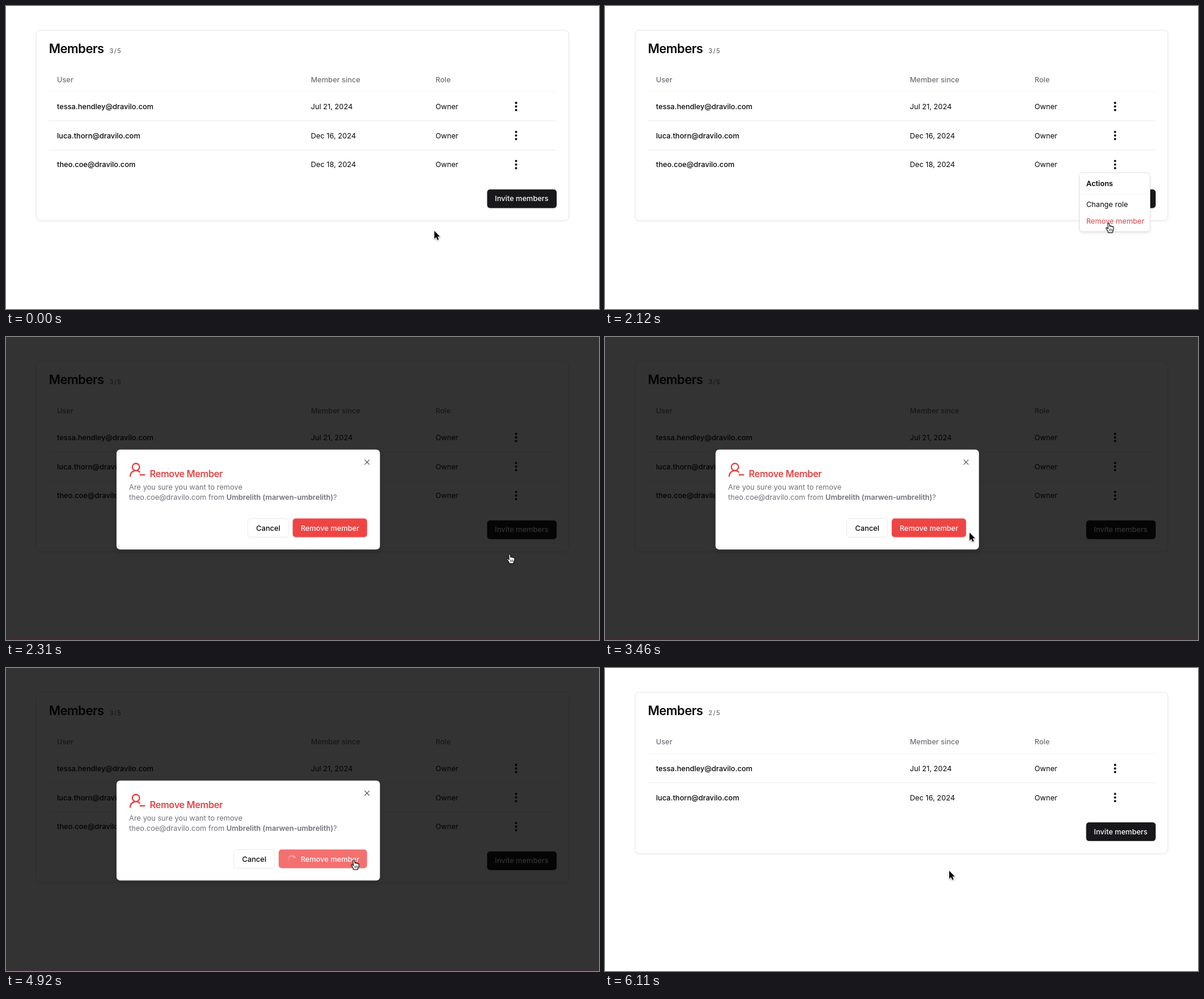
These frames come from a looping animation (994 px wide and 508 px high, 6190 ms). An HTML page with a canvas:

```html
<!DOCTYPE html>
<html lang="en">
<head>
<meta charset="utf-8">
<title>Members</title>
<style>
  html, body { margin: 0; width: 100%; height: 100%; overflow: hidden; background: #fff; }
  canvas { display: block; width: 994px; height: 508px; }
</style>
</head>
<body>
<canvas id="stage"></canvas>
<script>
const W = 994, H = 508, LOOP = 6190, ROW = 48.7;
const RED = '#ef4444', INK = '#09090b', MUTED = '#71717a', LINE = '#e4e4e7';
const canvas = document.getElementById('stage');
const ctx = canvas.getContext('2d');
const dpr = window.devicePixelRatio || 1;
canvas.width = W * dpr;
canvas.height = H * dpr;

const members = [
  ['tessa.hendley@dravilo.com', 'Jul 21, 2024'],
  ['luca.thorn@dravilo.com', 'Dec 16, 2024'],
  ['theo.coe@dravilo.com', 'Dec 18, 2024']
];

const inOut = p => p * p * (3 - 2 * p);
const out = p => 1 - (1 - p) ** 2;

// Pointer moves: start, end, steps, target x, target y, easing
const start = [718, 377];
const moves = [
  [100, 500, 5, 853, 262, inOut],
  [1260, 1840, 8, 844, 364, inOut],
  [2650, 3190, 7, 646, 335.6, inOut],
  [3280, 3810, 6, 583, 322, out],
  [5540, 5540, 1, 582, 323, out],
  [6110, 6110, 1, 577, 340, out]
];
const between = (t, a, b) => t >= a && t < b;

// Value of the last [time, value] pair reached
function held(t, pairs) {
  let v = 0;
  for (const [at, value] of pairs) if (t >= at) v = value;
  return v;
}

function pointerAt(t) {
  let [x, y] = start;
  for (const [a, b, n, tx, ty, ease] of moves) {
    if (t < a) break;
    const i = n > 1 ? Math.min(n - 1, Math.floor((t - a) / (b - a) * (n - 1))) : 0;
    const p = ease((i + 1) / n);
    x += (tx - x) * p;
    y += (ty - y) * p;
  }
  return [x, y];
}

function text(str, x, y, { size = 12.2, weight = 400, color = INK, align = 'left', spacing = 0 } = {}) {
  ctx.font = `${weight} ${size}px Inter, "Liberation Sans", sans-serif`;
  ctx.letterSpacing = spacing + 'px';
  ctx.textAlign = align;
  ctx.fillStyle = color;
  ctx.fillText(str, x, y);
  return x + ctx.measureText(str).width;
}

function box(x, y, w, h, r, fill, border, shadow) {
  ctx.save();
  ctx.beginPath();
  ctx.roundRect(x, y, w, h, r);
  if (shadow) {
    const [alpha, blur, dy] = shadow;
    ctx.shadowColor = `rgba(0,0,0,${alpha})`;
    ctx.shadowBlur = blur * dpr;
    ctx.shadowOffsetY = dy * dpr;
  }
  ctx.fillStyle = fill;
  ctx.fill();
  ctx.shadowColor = 'transparent';
  if (border) {
    ctx.strokeStyle = border;
    ctx.lineWidth = 1;
    ctx.stroke();
  }
  ctx.restore();
}

function rule(x1, x2, y, color) {
  ctx.fillStyle = color;
  ctx.fillRect(x1, y, x2 - x1, 1);
}

function strokePath(d, color, width) {
  ctx.strokeStyle = color;
  ctx.lineWidth = width;
  ctx.lineCap = ctx.lineJoin = 'round';
  ctx.stroke(new Path2D(d));
}

function drawCard(count) {
  const lift = (3 - count) * ROW;
  box(50.5, 40.5, 893, 319.5 - lift, 7, '#fff', LINE, [0.05, 2, 1]);
  text('Members', 72, 79, { size: 20.9, weight: 600, spacing: -0.52 });
  text(count + '/5', 173.5, 79, { size: 10.4, color: '#52525b', spacing: 1.4 });

  const head = { weight: 500, color: MUTED };
  text('User', 85.5, 127.6, head);
  text('Member since', 511, 127.6, head);
  text('Role', 720, 127.6, head);
  rule(72, 923, 143, '#f4f4f5');

  members.slice(0, count).forEach(([mail, since], i) => {
    const y = 168.4 + i * ROW;
    text(mail, 85.5, y + 4.5, { weight: 500 });
    text(since, 511, y + 4.5);
    text('Owner', 720, y + 4.5);
    ctx.fillStyle = INK;
    for (const dy of [-6, 0, 6]) {
      ctx.beginPath();
      ctx.arc(855, y + dy, 1.9, 0, Math.PI * 2);
      ctx.fill();
    }
    if (i < count - 1) rule(72, 923, Math.round(192 + i * ROW), '#ebebed');
  });

  box(806.5, 307.5 - lift, 116.5, 31.3, 5, '#18181b', null, [0.12, 2, 1]);
  text('Invite members', 864.5, 327.3 - lift, { weight: 500, color: '#fafafa', align: 'center' });
}

function drawMenu(alpha) {
  ctx.save();
  ctx.globalAlpha = alpha;
  const scale = 0.95 + 0.05 * alpha;
  ctx.translate(855, 279);
  ctx.scale(scale, scale);
  ctx.translate(-855, -279);
  box(795.5, 279.5, 118, 98.5, 5, '#fff', LINE, [0.12, 5, 2]);
  text('Actions', 806.7, 302, { weight: 600 });
  rule(796, 913, 315, '#f1f1f3');
  text('Change role', 806.7, 337.3);
  text('Remove member', 806.7, 364.6, { color: '#d64545' });
  ctx.restore();
}

function drawSpinner(x, y, angle) {
  ctx.save();
  ctx.translate(x, y);
  ctx.rotate(angle);
  ctx.lineCap = 'round';
  ctx.lineWidth = 1.1;
  for (let i = 0; i < 12; i++) {
    ctx.strokeStyle = `rgba(255,255,255,${Math.max(0, 0.85 - i * 0.12)})`;
    ctx.beginPath();
    ctx.moveTo(4.2, 0);
    ctx.lineTo(6.8, 0);
    ctx.stroke();
    ctx.rotate(-Math.PI / 6);
  }
  ctx.restore();
}

function drawDialog(t, alpha) {
  const loading = between(t, 4470, 5000);
  const hover = between(t, 3600, 4470);
  const grow = loading ? 23.5 : 0;
  const scale = 0.957 + 0.043 * alpha;
  ctx.save();
  ctx.globalAlpha = alpha;
  ctx.translate(406, 272.5 + 3 * (1 - alpha));
  ctx.scale(scale, scale);
  ctx.translate(-406, -272.5);
  box(185.3, 188.7, 441.5, 167.6, 6, '#fff', null, [0.15, 8, 4]);

  strokePath('M601.5 206.2l7.4 7.4M608.9 206.2l-7.4 7.4', '#52525b', 1.2);

  ctx.save();
  ctx.translate(205.8, 208.4);
  ctx.scale(1.2, 1.2);
  strokePath('M2 21a8 8 0 0 1 13.292-6M22 19h-6M15 8a5 5 0 1 1-10 0a5 5 0 1 1 10 0', '#e34646', 1.9);
  ctx.restore();

  text('Remove Member', 241, 234.6, { size: 15.6, weight: 600, color: '#e34646', spacing: -0.39 });
  const body = { color: MUTED };
  text('Are you sure you want to remove', 206.3, 255.5, body);
  let x = text(members[2][0] + ' from ', 206.3, 272.8, body);
  x = text('Umbrelith (marwen-umbrelith)', x, 272.8, { weight: 600, color: MUTED });
  text('?', x, 272.8, body);

  box(405.3 - grow, 304.5, 68.4, 31, 5, '#fff', '#ebebed', [0.04, 2, 1]);
  text('Cancel', 439.5 - grow, 324.7, { weight: 500, align: 'center' });
  const fill = loading ? '#f37070' : hover ? '#f15757' : RED;
  box(480.6 - grow, 304.3, 124.6 + grow, 31.2, 5, fill, null, [0.1, 2, 1]);
  text('Remove member', 543, 324.7, { weight: 500, color: '#fafafa', align: 'center' });
  if (loading) {
    const tick = Math.floor((t - 4380) / 90) * 90 + 4380;
    drawSpinner(479, 320, (tick - 4920) / 1000 * Math.PI * 2 - 0.5);
  }
  ctx.restore();
}

const arrow = new Path2D('M0 0V13.2L3 10.4 5.1 15.2 7.4 14.2 5.3 9.5H9.4z');
const hand = new Path2D('M4.2 10.5 2.6 8.8C1.6 7.9.3 8.8 1 10l3.2 4.8v1.9h7.6v-1.9c1.2-1.6 1.6-3.2 1.6-5.2V7.8' +
  'c0-1.3-2-1.4-2-.2v-.5c0-1.3-2.2-1.4-2.2-.2v-.5C9.2 5.2 7 5.2 7 6.4L6.2 1.9C5.9.4 3.7.8 3.9 2.3z');

function drawPointer(t) {
  const [x, y] = pointerAt(t);
  const pointing = between(t, 400, 2650) || between(t, 3600, 5540);
  ctx.save();
  ctx.translate(x, y);
  ctx.lineJoin = 'round';
  ctx.shadowColor = 'rgba(0,0,0,.35)';
  ctx.shadowBlur = 2.5 * dpr;
  ctx.shadowOffsetY = dpr;
  if (pointing) {
    ctx.translate(-5, -1);
    ctx.fillStyle = '#fff';
    ctx.fill(hand);
    ctx.shadowColor = 'transparent';
    ctx.strokeStyle = '#111';
    ctx.lineWidth = 1.1;
    ctx.stroke(hand);
    strokePath('M6.6 10.8v3M8.6 10.8v3M10.6 10.8v3', '#111', 0.8);
  } else {
    ctx.strokeStyle = '#fff';
    ctx.lineWidth = 1.8;
    ctx.stroke(arrow);
    ctx.shadowColor = 'transparent';
    ctx.fillStyle = '#000';
    ctx.fill(arrow);
  }
  ctx.restore();
}

function draw(t) {
  ctx.setTransform(dpr, 0, 0, dpr, 0, 0);
  ctx.fillStyle = '#fff';
  ctx.fillRect(0, 0, W, H);
  drawCard(t < 5190 ? 3 : 2);

  const menu = held(t, [[850, 0.6], [940, 1], [2210, 0]]);
  if (menu) drawMenu(menu);

  const modal = held(t, [[2210, 0.55], [2310, 1], [5000, 0.075], [5090, 0]]);
  if (modal) {
    ctx.fillStyle = `rgba(0,0,0,${0.8 * modal})`;
    ctx.fillRect(0, 0, W, H);
    if (modal === 1) {
      ctx.fillStyle = '#412c33';
      ctx.fillRect(0, 505, W, 3);
    }
    drawDialog(t, modal);
  }
  drawPointer(t);
}

const begin = performance.now();
function tick() {
  draw((performance.now() - begin) % LOOP);
  requestAnimationFrame(tick);
}
tick();
</script>
</body>
</html>
```
